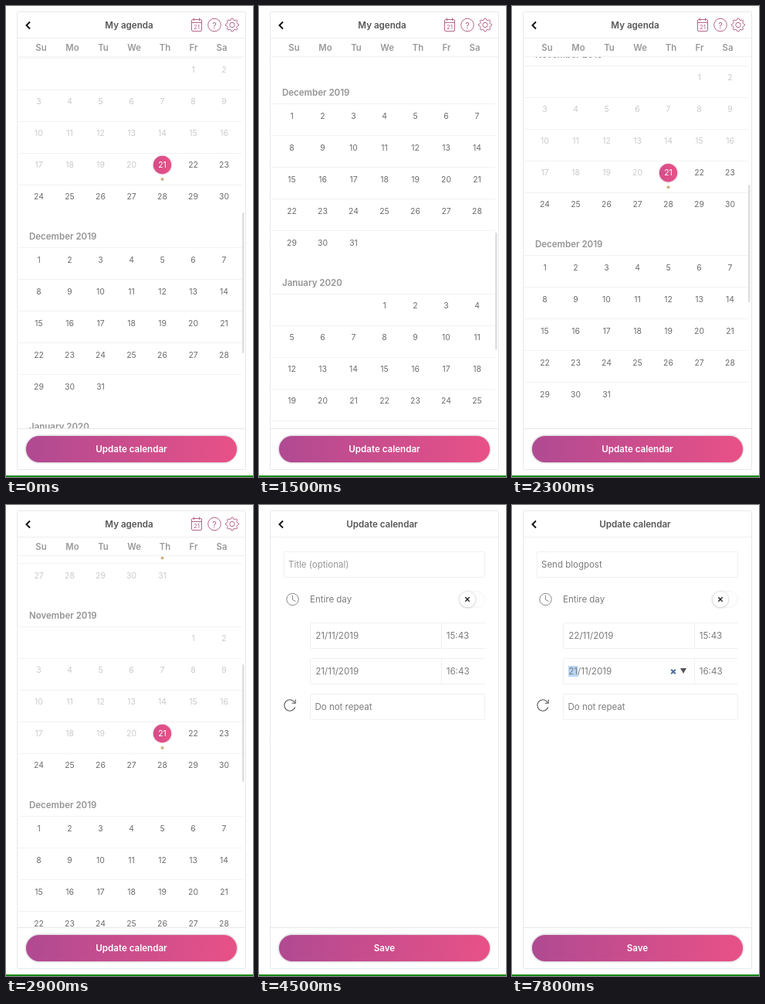
Write an HTML page with a canvas that moves like this. It is 320 by 609 pixels and loops after 8 s.

```html
<!DOCTYPE html>
<html lang="en">
<head>
<meta charset="utf-8">
<title>Agenda</title>
<style>
html, body { margin: 0; width: 100%; height: 100%; overflow: hidden; background: #fff; }
canvas { display: block; width: 320px; height: 609px; }
</style>
</head>
<body>
<canvas id="stage"></canvas>
<script>
const LOOP = 8000, STEP = 100, W = 320, H = 609;
const FORM_AT = 4100, LOADED_AT = 1100;
const ROW = 41, MONTH = 245.5;
const DAYS = ['Su', 'Mo', 'Tu', 'We', 'Th', 'Fr', 'Sa'];
const DAY_X = [45.5, 86, 126, 166, 206, 243, 279.5];
// name, weekday of the 1st, length; December is the anchor at index 2
const MONTHS = [
  ['October 2019', 2, 31], ['November 2019', 5, 30], ['December 2019', 0, 31],
  ['January 2020', 3, 31], ['February 2020', 6, 29]
];
// time and y of the first December row
const SCROLL = [
  [0, 328], [200, 212], [400, 112], [600, 73], [1200, 73], [1600, 165],
  [1900, 259], [2400, 358], [2900, 418], [3500, 436], [4100, 438]
];
const PINK = '#b5638a', EDGE = '#f0f0f0', INK = '#7c7c7c';

const canvas = document.getElementById('stage');
const ctx = canvas.getContext('2d');
const dpr = window.devicePixelRatio || 1;
canvas.width = W * dpr;
canvas.height = H * dpr;

function text(str, x, y, size, color, weight = 400, align = 'left') {
  ctx.font = `${weight} ${size}px Inter, Roboto, sans-serif`;
  ctx.fillStyle = color;
  ctx.textAlign = align;
  ctx.fillText(str, x, y + size * 0.36);
}

function line(color, width, ...pts) {
  ctx.strokeStyle = color;
  ctx.lineWidth = width;
  ctx.beginPath();
  pts.forEach(([x, y]) => ctx.lineTo(x, y));
  ctx.stroke();
}

function rule(y, x0, x1, color = '#f2f2f2') {
  const py = Math.round(y) + 0.5;
  line(color, 1, [x0, py], [x1, py]);
}

function circle(x, y, r, fill, stroke, width = 1) {
  ctx.beginPath();
  ctx.arc(x, y, r, 0, Math.PI * 2);
  if (fill) { ctx.fillStyle = fill; ctx.fill(); }
  if (stroke) { ctx.strokeStyle = stroke; ctx.lineWidth = width; ctx.stroke(); }
}

function box(x, y, w, h, r, fill, stroke) {
  ctx.beginPath();
  ctx.roundRect(x, y, w, h, r);
  if (fill) { ctx.fillStyle = fill; ctx.fill(); }
  if (stroke) { ctx.strokeStyle = stroke; ctx.lineWidth = 1; ctx.stroke(); }
}

function cross(x, y, r, color, width) {
  line(color, width, [x - r, y - r], [x + r, y + r]);
  line(color, width, [x + r, y - r], [x - r, y + r]);
}

function blend(x0, x1, from, to) {
  const g = ctx.createLinearGradient(x0, 0, x1, 0);
  g.addColorStop(0, from);
  g.addColorStop(1, to);
  return g;
}

function track(points, t) {
  const last = points.length - 1;
  if (t >= points[last][0]) return points[last][1];
  const i = points.findIndex(p => p[0] > t) - 1;
  const [t0, v0] = points[i], [t1, v1] = points[i + 1];
  return v0 + (v1 - v0) * (t - t0) / (t1 - t0);
}

function frame(title, label) {
  box(14.5, 7.5, 296, 592, 1, null, '#e8e8e8');
  rule(41, 15, 310, '#eeeeee');
  line('#111', 2, [31, 20.5], [26.5, 25], [31, 29.5]);
  text(title, 159.5, 24.5, 11.6, '#555', 600, 'center');
  rule(546, 15, 310, '#e8e8e8');
  ctx.save();
  ctx.shadowColor = 'rgba(70,40,60,.5)';
  ctx.shadowBlur = 3 * dpr;
  box(26, 556, 273, 34, 17, blend(26, 299, '#b04a92', '#e85187'));
  ctx.restore();
  text(label, 162.5, 573, 11.6, '#fff', 600, 'center');
  ctx.fillStyle = '#128a12';
  ctx.fillRect(0, 607, W, 2);
}

function gear(x, y) {
  ctx.strokeStyle = PINK;
  ctx.lineWidth = 1;
  ctx.beginPath();
  for (let i = 0; i < 32; i++) {
    const a = (i - 0.5) * Math.PI / 16, r = i % 4 < 2 ? 8.5 : 6.6;
    ctx.lineTo(x + r * Math.cos(a), y + r * Math.sin(a));
  }
  ctx.closePath();
  ctx.stroke();
  circle(x, y, 3.2, null, PINK);
}

function icons() {
  box(240.5, 17.5, 13, 15, 1.5, null, PINK);
  rule(21, 241, 253, PINK);
  line(PINK, 1, [243.5, 15.5], [243.5, 19]);
  line(PINK, 1, [250.5, 15.5], [250.5, 19]);
  text('21', 247, 27.3, 8, PINK, 400, 'center');
  circle(270, 24.5, 8.3, null, PINK);
  text('?', 270, 24.7, 11, PINK, 400, 'center');
  gear(293, 24.5);
}

function month([name, first, length], index, top) {
  text(name, 30, top - 30, 11.5, '#949494', 600);
  rule(top - 16, 16, 306);
  for (let r = 0; r < 4; r++) rule(top + r * ROW + 25, 16, 306);
  for (let d = 1; d <= length; d++) {
    const cell = d + first - 1;
    const x = 42.5 + cell % 7 * 40, y = top + Math.floor(cell / 7) * ROW;
    const today = index === 1 && d === 21;
    const past = index < 1 || index === 1 && d < 21;
    if (today) {
      circle(x, y, 13, '#f6e4ec');
      circle(x, y, 11.7, blend(x - 12, x + 12, '#d44d89', '#e95188'));
    }
    if (today || index === 0 && d === 24) circle(x, y + 18.5, 2, '#d0b183');
    text(String(d), x, y, 10.4, today ? '#fff' : past ? '#cacaca' : '#6c6c6c', 400, 'center');
  }
}

function agenda(t) {
  const top = track(SCROLL, t), loaded = t >= LOADED_AT;
  ctx.save();
  ctx.beginPath();
  ctx.rect(15, 66, 295, 480);
  ctx.clip();
  MONTHS.slice(0, loaded ? 5 : 4).forEach((m, i) => month(m, i, top + (i - 2) * MONTH));
  if (!loaded) {
    const faint = (Math.floor(t / 200) + 2) % 3;
    for (let i = 0; i < 3; i++)
      circle(152 + i * 10.2, top + 454, 2.3, i === faint ? '#ecdfe5' : '#b9587f');
  }
  const thumb = loaded ? 256 - (top - 259) * 0.3145 : 267 + (328 - top) * 0.3725;
  box(306, thumb, 2.5, loaded ? 152 : 182, 1.2, '#dedede');
  ctx.restore();
  rule(65, 16, 310);
  DAYS.forEach((d, i) => text(d, DAY_X[i], 53.5, 11.3, '#999', 600, 'center'));
  frame('My agenda', 'Update calendar');
  icons();
}

function dateRow(y, date, time, active) {
  box(66.5, y - 16.5, 170, 33, 1, null, EDGE);
  line(EDGE, 1, [293, y - 16.5], [236.5, y - 16.5], [236.5, y + 16.5], [293, y + 16.5]);
  if (active) {
    ctx.fillStyle = '#b9d6f8';
    ctx.fillRect(73, y - 7, 12.5, 14);
    cross(209, y + 0.5, 2.8, '#4d6f9e', 2);
    ctx.fillStyle = '#555';
    ctx.beginPath();
    ctx.moveTo(218, y - 4);
    ctx.lineTo(226, y - 4);
    ctx.lineTo(222, y + 3);
    ctx.fill();
  }
  text(date, 73.3, y, 11.6, INK);
  text(time, 242.7, y, 11.6, INK);
}

function form(t) {
  const full = 'Send blogpost';
  const typed = t < 5400 ? '' : full.slice(0, [4, 9][(t - 5400) / STEP] || full.length);
  frame('Update calendar', 'Save');

  box(32.5, 60.5, 260, 33, 1, null, EDGE);
  text(typed || 'Title (optional)', 38, 77, 11.5, typed ? INK : '#969696');
  if (t >= 5400 && t < 6000) {
    const x = 38.5 + ctx.measureText(typed).width;
    line('#444', 1, [x, 70], [x, 84]);
  }

  circle(43.5, 122, 7.7, null, '#8a8a8a');
  line('#8a8a8a', 1, [43.5, 116.5], [43.5, 122.5], [47.5, 124.5]);
  text('Entire day', 66, 122, 11.5, INK);
  box(259.5, 111.5, 33, 21, 10.5, '#fefefe', '#f5f5f5');
  ctx.save();
  ctx.shadowColor = 'rgba(0,0,0,.28)';
  ctx.shadowBlur = 3 * dpr;
  ctx.shadowOffsetY = dpr * 0.5;
  circle(270, 122, 10.3, '#fff');
  ctx.restore();
  cross(270, 122, 2.7, '#222', 1.4);

  dateRow(169, t < 6800 ? '21/11/2019' : '22/11/2019', '15:43', t >= 6400 && t < 7800);
  dateRow(215, '21/11/2019', '16:43', t >= 7800);

  ctx.strokeStyle = '#555';
  ctx.lineWidth = 1.1;
  ctx.beginPath();
  ctx.arc(40, 259, 7.2, 0.35, Math.PI * 2 - 0.45);
  ctx.stroke();
  line('#555', 1.1, [47.2, 251.5], [47.2, 256.2], [42.7, 256.2]);
  box(66.5, 244.5, 226, 33, 1, null, EDGE);
  text('Do not repeat', 72.5, 261, 11.5, INK);
}

function draw(now) {
  const t = Math.floor(now % LOOP / STEP) * STEP;
  ctx.setTransform(dpr, 0, 0, dpr, 0, 0);
  ctx.fillStyle = '#fff';
  ctx.fillRect(0, 0, W, H);
  (t < FORM_AT ? agenda : form)(t);
}

let start;
function tick(now) {
  start ??= now;
  draw(now - start);
  requestAnimationFrame(tick);
}
draw(0);
requestAnimationFrame(tick);
</script>
</body>
</html>
```
